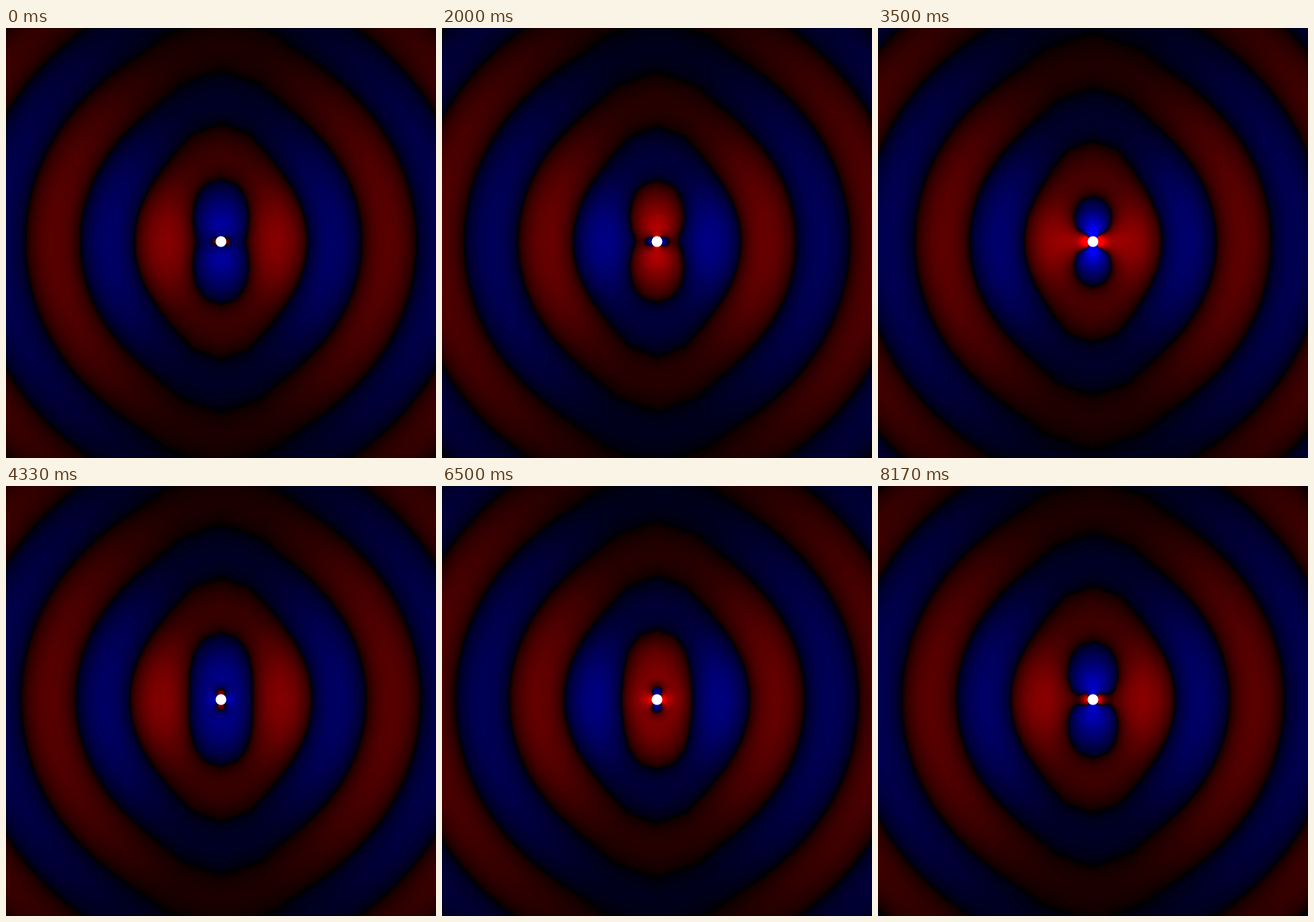
Animation of 600 by 600 pixels, one loop 8340 ms. Source, as an HTML page without scripts:

```html
<!DOCTYPE html>
<html lang="en">
<head>
<meta charset="utf-8">
<title>Dipole radiation</title>
<style>
  @property --s {
    syntax: "<length>";
    inherits: true;
    initial-value: 0px;
  }
  html, body {
    margin: 0;
    width: 100%;
    height: 100%;
    overflow: hidden;
    background: #000;
  }
  .stage {
    --at: circle at 300px 298px;
    position: fixed;
    inset: 0;
    isolation: isolate;
    overflow: hidden;
    animation: flow 4170ms steps(25) -9ms infinite;
  }
  @keyframes flow { to { --s: 150px; } }
  .stage div { position: absolute; inset: 0; }

  /* signed field: mid grey is zero, white positive, black negative */
  .field { filter: url(#sign); }
  .wave {
    background: repeating-radial-gradient(var(--at),
      #fff var(--p),
      #eeeeee calc(var(--p) + 12.5px),
      #bfbfbf calc(var(--p) + 25px),
      #808080 calc(var(--p) + 37.5px),
      #404040 calc(var(--p) + 50px),
      #111111 calc(var(--p) + 62.5px),
      #000 calc(var(--p) + 75px),
      #111111 calc(var(--p) + 87.5px),
      #404040 calc(var(--p) + 100px),
      #808080 calc(var(--p) + 112.5px),
      #bfbfbf calc(var(--p) + 125px),
      #eeeeee calc(var(--p) + 137.5px),
      #fff calc(var(--p) + 150px));
  }
  .cos { --p: calc(var(--s) + 11.2px); }
  .sin { --p: calc(var(--s) + 51.5px); }
  .neg-sin { --p: calc(var(--s) - 26.3px); }
  .neg-cos { --p: calc(var(--s) + 86.2px); }

  /* near-field terms fade with distance */
  .neg-sin {
    mask-image: radial-gradient(var(--at),
      #000 11px, rgb(0 0 0 / .8) 15px, rgb(0 0 0 / .62) 20px,
      rgb(0 0 0 / .48) 27px, rgb(0 0 0 / .335) 40px, rgb(0 0 0 / .229) 60px,
      rgb(0 0 0 / .14) 100px, rgb(0 0 0 / .089) 160px,
      rgb(0 0 0 / .055) 260px, rgb(0 0 0 / .033) 430px);
  }
  .neg-cos {
    mask-image: radial-gradient(var(--at), rgb(0 0 0 / .2) 7px, transparent 12px);
  }
  .axial {
    mask-image: repeating-conic-gradient(at 300px 298px,
      #000 0deg, rgb(0 0 0 / .933) 15deg, rgb(0 0 0 / .75) 30deg,
      rgb(0 0 0 / .5) 45deg, rgb(0 0 0 / .25) 60deg, rgb(0 0 0 / .067) 75deg,
      transparent 90deg, rgb(0 0 0 / .067) 105deg, rgb(0 0 0 / .25) 120deg,
      rgb(0 0 0 / .5) 135deg, rgb(0 0 0 / .75) 150deg, rgb(0 0 0 / .933) 165deg,
      #000 180deg);
  }
  .axial .cos {
    mask-image: radial-gradient(var(--at),
      rgb(0 0 0 / .315) 7px, rgb(0 0 0 / .24) 10px, rgb(0 0 0 / .177) 15px,
      rgb(0 0 0 / .097) 30px, rgb(0 0 0 / .05) 60px,
      rgb(0 0 0 / .02) 150px, transparent 400px);
  }
  .fade {
    background: radial-gradient(var(--at),
      rgb(128 128 128 / 0) 24px, rgb(128 128 128 / .363) 40px,
      rgb(128 128 128 / .565) 60px, rgb(128 128 128 / .733) 100px,
      rgb(128 128 128 / .832) 160px, rgb(128 128 128 / .896) 260px,
      rgb(128 128 128 / .936) 430px);
  }

  /* brightness by distance */
  .glow {
    mix-blend-mode: color-dodge;
    background: radial-gradient(var(--at), #787878 8px, #333 15px, #000 22px);
  }
  .shade {
    background: radial-gradient(var(--at),
      rgb(0 0 0 / 0) 20px, rgb(0 0 0 / .14) 28px, rgb(0 0 0 / .26) 40px,
      rgb(0 0 0 / .33) 50px, rgb(0 0 0 / .43) 80px, rgb(0 0 0 / .52) 120px,
      rgb(0 0 0 / .58) 160px, rgb(0 0 0 / .645) 240px,
      rgb(0 0 0 / .685) 340px, rgb(0 0 0 / .71) 430px);
  }
  svg { position: absolute; left: 0; top: 0; }
</style>
</head>
<body>
<div class="stage">
  <div class="field">
    <div class="wave cos"></div>
    <div class="wave neg-sin"></div>
    <div class="wave neg-cos"></div>
    <div class="axial">
      <div class="wave sin"></div>
      <div class="wave cos"></div>
      <div class="fade"></div>
    </div>
  </div>
  <div class="glow"></div>
  <div class="shade"></div>
  <svg width="600" height="600">
    <filter id="sign" x="0" y="0" width="100%" height="100%" color-interpolation-filters="sRGB">
      <feComponentTransfer>
        <feFuncR type="linear" slope="-2" intercept="1.004"/>
        <feFuncG type="linear" slope="0" intercept="0"/>
        <feFuncB type="linear" slope="2" intercept="-1.004"/>
      </feComponentTransfer>
      <feComponentTransfer>
        <feFuncR type="gamma" exponent=".5"/>
        <feFuncB type="gamma" exponent=".5"/>
      </feComponentTransfer>
    </filter>
    <circle cx="300" cy="298" r="7.5" fill="#fff"/>
  </svg>
</div>
</body>
</html>
```
